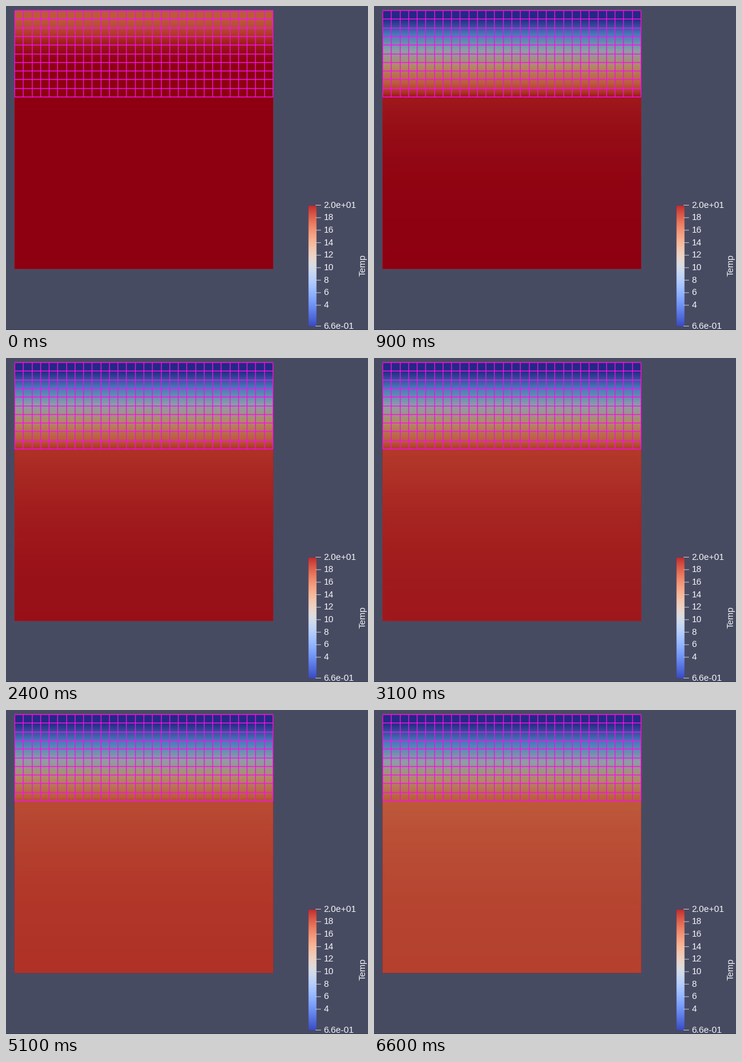
A matplotlib script that plays this animation: 600x536 px, repeating every 6700 ms.

```python
import matplotlib.pyplot as plt
import numpy as np
from matplotlib.animation import FuncAnimation
from matplotlib.collections import LineCollection
from matplotlib.colors import LinearSegmentedColormap
from matplotlib.patches import Rectangle

W, H, DPI = 600, 536, 100
FRAMES = 67
PX = 72 / DPI
LEFT, RIGHT, TOP, MID, BOTTOM = 14, 443, 7, 150, 435
COLS, ROWS, NODES = 30, 10, 31
T_MIN, T_MAX = 0.66, 20.0

# Shaded surface colours from cold to hot
SURFACE = LinearSegmentedColormap.from_list("surface", [
    (0, "#242884"), (.2, "#487abe"), (.4, "#8e9ea8"), (.6, "#b48866"),
    (.8, "#be5b3c"), (.9, "#b13428"), (1, "#8e0011")], N=512)


def diffuse(substeps=24):
    """Cool a poorly conducting layer on top of a well conducting block."""
    node = np.arange(NODES)
    conduct = np.where(node[:-1] < ROWS, 0.52, 7.5)
    capacity = np.where(node < ROWS, 0.12, 1.0)
    capacity[ROWS] = 0.56
    capacity[-1] = 0.5
    depth = np.maximum(node - 1, 0)
    s = 1 - 0.2 * np.exp(-((depth + 0.35) / 2.8) ** 2)
    start = s[0]
    history = [s.copy()]
    for step in range(1, (FRAMES - 1) * substeps + 1):
        flux = conduct * np.diff(s)
        s = s + np.diff(flux, prepend=0, append=0) / capacity / substeps
        s[:2] = start * np.exp(-step / substeps / 0.8)
        if step % substeps == 0:
            history.append(s.copy())
    return history


history = diffuse()
node_y = np.linspace(TOP, BOTTOM, NODES)
pixel_y = np.arange(TOP, BOTTOM) + 0.5

fig = plt.figure(figsize=(W / DPI, H / DPI), dpi=DPI, facecolor="#474b62")
ax = fig.add_axes([0, 0, 1, 1])
ax.axis("off")


def surface(frame):
    return np.interp(pixel_y, node_y, history[frame])[:, None]


def column(values, cmap, x0, x1, y0, y1):
    return ax.imshow(values, cmap=cmap, vmin=0, vmax=1, aspect="auto",
                     extent=(x0, x1, y1, y0), interpolation="nearest")


def frame_box(x0, y0, x1, y1, color, alpha):
    ax.add_patch(Rectangle((x0, y0), x1 - x0, y1 - y0, fill=False, ec=color,
                           lw=PX, alpha=alpha, snap=False))


def lines(segments, color, width):
    ax.add_collection(LineCollection(segments, colors=color, snap=False,
                                     linewidths=width * PX, zorder=3))


def centres(first, last, count):
    """Evenly spaced positions, each moved to the middle of its pixel."""
    return np.floor(np.linspace(first, last, count) + 0.5) + 0.5


def label(x, y, text, **style):
    ax.text(x, y, text, color="#f4f4f6", family="Liberation Sans",
            size=14.8 * PX, **style)


block = column(surface(0), SURFACE, LEFT, RIGHT, TOP, BOTTOM)
frame_box(LEFT, TOP, RIGHT, BOTTOM + 0.3, "#8c2c38", 0.6)

# Mesh over the upper layer
xs = centres(LEFT, RIGHT - 1, COLS + 1)
ys = centres(TOP, MID, ROWS + 1)
lines([[(x, ys[0]), (x, ys[-1])] for x in xs], "#ee12e0", 1.35)
lines([[(xs[0], y), (xs[-1], y)] for y in ys], "#f612ea", 1.45)

# Legend
column(np.linspace(0.96, 0, 200)[:, None], "coolwarm", 501, 515, 330, 530)
frame_box(501.3, 330, 514.7, 530, "#3c3f5a", 0.45)
for temp in [T_MIN, *range(4, 20, 2), T_MAX]:
    y = 529.5 - 200 * (temp - T_MIN) / (T_MAX - T_MIN)
    text = str(temp) if isinstance(temp, int) else f"{temp:.1e}"
    lines([[(513, y), (522, y)]], "#c9cad4", 1)
    label(526.5, y + 4, text, va="baseline")
label(591.5, 429, "Temp", rotation=90, ha="center", va="center")

lines([[(0, H - 0.5), (W, H - 0.5)]], "#3a3e53", 1)
ax.set_xlim(0, W)
ax.set_ylim(H, 0)


def update(frame):
    block.set_data(surface(frame))
    return (block,)


anim = FuncAnimation(fig, update, frames=FRAMES, interval=100,
                     repeat=True, repeat_delay=0, blit=False)
plt.show()
```
